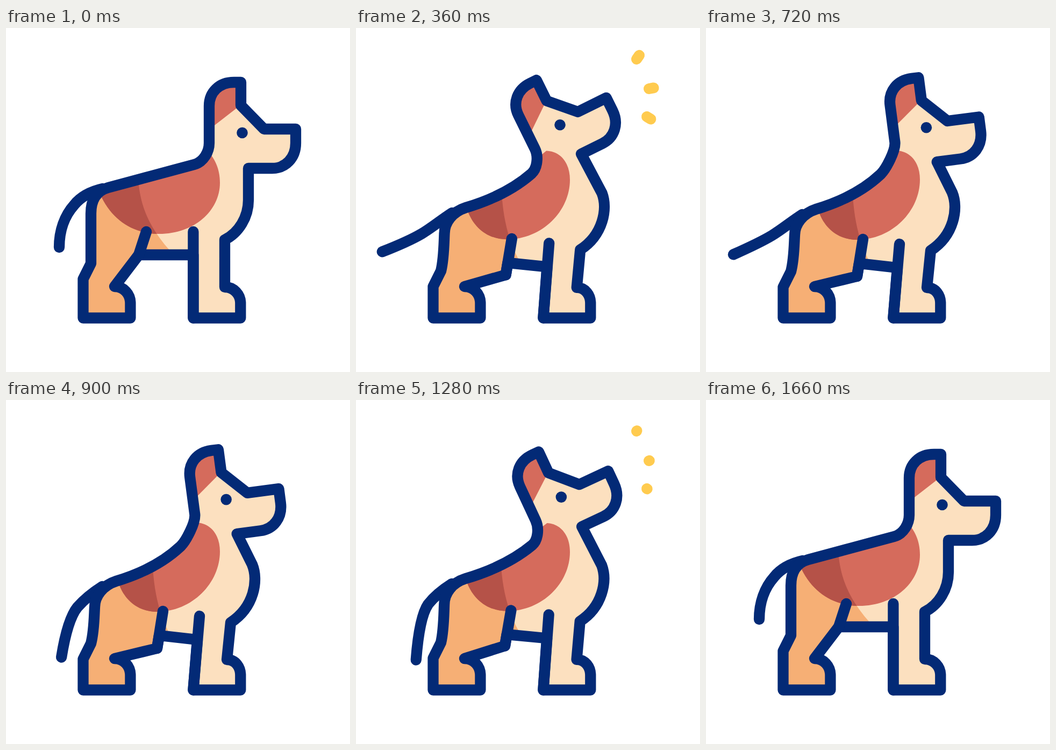
An HTML page that plays this animation: 640x640 px, repeating every 2400 ms.

```html
<!DOCTYPE html>
<html lang="en">
<head>
<meta charset="utf-8">
<title>Barking dog</title>
<style>
  html, body { margin: 0; width: 100%; height: 100%; overflow: hidden; background: #fff; }
  svg { display: block; width: 100%; height: 100%; }
  .line { fill: none; stroke: #032a76; stroke-width: 20.3; stroke-linecap: round; stroke-linejoin: round; }
</style>
</head>
<body>
<svg viewBox="0 0 640 640">
  <clipPath id="inside"><path id="clip"/></clipPath>
  <clipPath id="inSaddle"><path id="saddleClip"/></clipPath>
  <path id="tail" class="line"/>
  <g clip-path="url(#inside)">
    <path id="coat" fill="#fce0bf"/>
    <path id="hind" fill="#f6af75"/>
    <path id="saddle" fill="#d56b5c"/>
    <g clip-path="url(#inSaddle)"><path id="shade" fill="#b55248"/></g>
    <path id="ear" fill="#d56b5c"/>
  </g>
  <path id="outline" class="line"/>
  <path id="limbs" class="line"/>
  <circle id="eye" r="10.3" fill="#032a76"/>
  <path id="sparks" fill="none" stroke="#ffcb4f" stroke-width="20" stroke-linecap="round"/>
</svg>
<script>
const LOOP = 2400, ACTION = 1620, CROUCH = 430;

// Each part as [standing, crouching]
const RUMP = [
  'M202 481 C219 481 231.4 495 231.4 512 L231.4 539.5 L143.5 539.5 L143.5 467 L158 438 C158 420 158 395 158 345 C158 320 168 303 190 297 C243 283 297 268 350 254 C368 249 ',
  'M202 481 C219 481 231.4 495 231.4 512 L231.4 539.5 L143.5 539.5 L143.5 482 L158 453 C164 430 164 400 165 385 C165 365 180 345 205 337 C245 325 290 305 325 272 C335 262 '];
const CHEST = [
  'L451 320 C451 352 433 381 407 394 L407 482 C424 482 436.3 496 436.3 512 L436.3 539.5 L348.4 539.5 L348.4 422 L247 422 ',
  'L458 306 C470 335 462 385 418 414 L411 483 C427 483 436.3 497 436.3 512 L436.3 539.5 L348.4 539.5 L356 446 L285 438 '];
const LIMBS = [
  'M261 379 L247 422 M348.4 379 L348.4 539.5',
  'M292 393 L281 462 M360 402 L348.4 539.5'];
const SADDLE = [
  'M178 315 C200 360 240 383 285 383 C350 383 398 340 398 288 C398 266 391 249 382 237 L372 236 L350 254 L190 297 Z',
  'M210 342 C222 376 250 394 280 394 C347 394 398 340 398 282 C398 250 380 228 352 228 L338 240 L325 272 L205 337 Z'];
const HIND = [
  'M246 280 C249 330 266 370 304 413 L290 480 L250 560 L120 560 L120 280 Z',
  'M273 310 C275 345 282 395 305 436 L290 480 L250 560 L120 560 L120 300 Z'];
const KNEE = ['L247 422 Z', 'L281 462 Z'];

// Head parts turn about the neck
const HEAD = '378 230 378 214 L378 145 C378 119 397 101 424 101 L437 101 L437 144 L480 188 L539 188 L539 214 C539 242 520 261 495 261 L451 261 ';
const EAR = 'M370 195 L437 143 L445 90 L366 90 Z';

// Tail poses relative to its root
const TAIL_REST = 'M5 -1 C-17 4 -36 14 -48 29 C-66 49 -76 77 -76 108';
const TAIL_DOWN = 'M-1 2 C-20 14 -34 26 -44 40 C-54 56 -60 92 -62 150';
const TAIL_UP = 'M-1 2 C-24 17 -39 30 -60 41 C-82 52 -111 58 -144 60';
const WAG = [[0, 0], [230, .12], [410, 1], [590, 0], [770, 1], [950, 0], [1130, 1], [1310, 0], [ACTION, 0]];

// Spark lines: inner and outer ends
const SPARKS = [[522, 58, 548, 21], [545, 113, 590, 105], [541, 165, 579, 188]];

const lerp = (a, b, k) => a + (b - a) * k;
const ease = x => { x = Math.min(1, Math.max(0, x)); return x * x * (3 - 2 * x); };
const ramp = (t, from, to) => ease((t - from) / (to - from));
const $ = id => document.getElementById(id);
const setPath = (id, d) => $(id).setAttribute('d', d);

function morph(a, b, k) {
  const number = /-?\d+(\.\d+)?/g, target = b.match(number);
  let i = 0;
  return a.replace(number, n => lerp(+n, +target[i++], k).toFixed(2));
}

const mapPoints = (d, fn) =>
  d.replace(/(-?[\d.]+) (-?[\d.]+)/g, (_, x, y) => fn(+x, +y).map(v => v.toFixed(2)).join(' '));

function track(t, keys) {
  let i = 0;
  while (i < keys.length - 2 && t > keys[i + 1][0]) i++;
  const [t0, v0] = keys[i], [t1, v1] = keys[i + 1];
  return lerp(v0, v1, ramp(t, t0, t1));
}

function draw(t) {
  const m = Math.max(0, Math.min(t, ACTION - t));   // body and head retrace their way back
  const crouch = ease(m / CROUCH);
  const pose = pair => morph(...pair, crouch);

  // The neck pivot swings back along a quarter arc
  const arc = crouch * Math.PI / 2;
  const px = lerp(396.5, 378, Math.sin(arc)), py = lerp(274, 279, Math.cos(arc));
  const angle = track(m, [[0, 0], [CROUCH, -28.2], [ACTION / 2, -4]]) * Math.PI / 180;
  const cos = Math.cos(angle), sin = Math.sin(angle);
  const turn = (x, y) => {
    const dx = x - 396.5, dy = y - 279;
    return [px + dx * cos - dy * sin, py + dx * sin + dy * cos];
  };

  const body = pose(RUMP) + mapPoints(HEAD, turn) + pose(CHEST) + pose(KNEE);
  for (const id of ['clip', 'coat', 'outline']) setPath(id, body);
  for (const id of ['saddle', 'saddleClip']) setPath(id, pose(SADDLE));
  for (const id of ['hind', 'shade']) setPath(id, pose(HIND));
  setPath('limbs', pose(LIMBS));
  setPath('ear', mapPoints(EAR, turn));
  const [ex, ey] = turn(439.5, 195);
  $('eye').setAttribute('cx', ex);
  $('eye').setAttribute('cy', ey);

  const hanging = morph(TAIL_REST, TAIL_DOWN, ramp(m, 0, 240));
  const tail = morph(hanging, TAIL_UP, track(t, WAG));
  const rx = lerp(175, 180, crouch), ry = lerp(300, 345, crouch);
  setPath('tail', mapPoints(tail, (x, y) => [x + rx, y + ry]));

  const head = ramp(m, 330, 440), rear = ramp(m, 420, 550);
  setPath('sparks', head > 0 && rear < 1 ? SPARKS.map(([x0, y0, x1, y1]) =>
    `M${lerp(x0, x1, rear)} ${lerp(y0, y1, rear)} L${lerp(x0, x1, head)} ${lerp(y0, y1, head)}`).join(' ') : '');
}

const start = performance.now();
function frame() {
  draw((performance.now() - start) % LOOP);
  requestAnimationFrame(frame);
}
draw(0);
requestAnimationFrame(frame);
</script>
</body>
</html>
```
